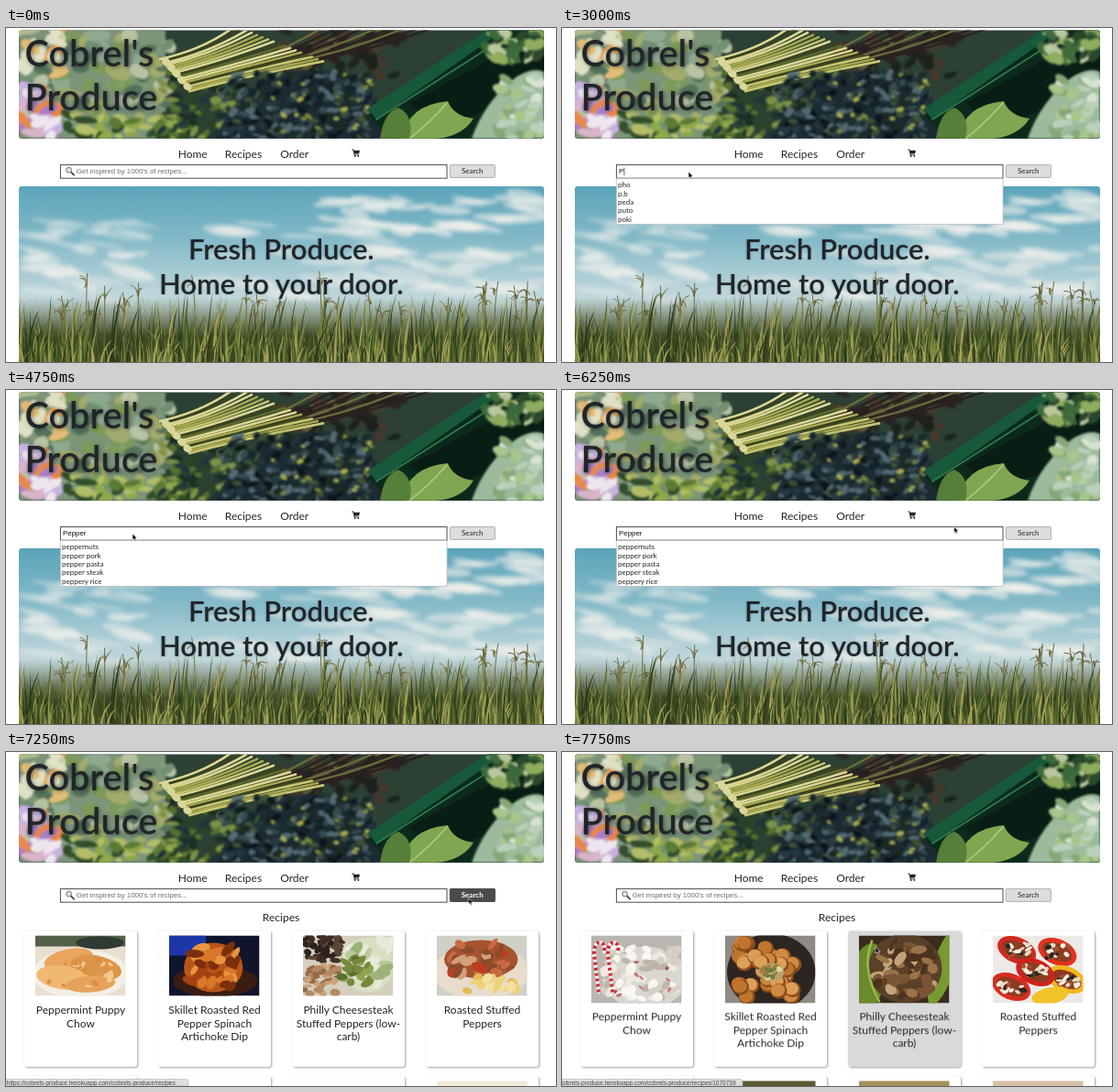
An HTML page that plays this animation: 600 by 365 pixels, repeating every 8 s.

```html
<!DOCTYPE html>
<html lang="en">
<head>
<meta charset="utf-8">
<title>Cobrel's Produce</title>
<style>
html, body { margin: 0; width: 100%; height: 100%; overflow: hidden; background: #fff; }
#stage { display: block; }
text { font-family: Lato, sans-serif; fill: #212529; }
.sans { font-family: "Liberation Sans", Arial, sans-serif; }
.mid { text-anchor: middle; }
.brand { font-weight: 600; filter: drop-shadow(1px 1px 2px rgba(20, 25, 25, .5)); }
.hero { font-weight: 600; filter: drop-shadow(0 0 1px rgba(30, 40, 45, .3)); }
.card { fill: #fff; filter: drop-shadow(1px 1px 1.2px rgba(0, 0, 0, .38)); }
</style>
</head>
<body>
<svg id="stage" width="600" height="365" viewBox="0 0 600 365" xmlns="http://www.w3.org/2000/svg"></svg>
<script>
const LOOP = 8000;
const $ = id => document.getElementById(id);

// seeded random helpers
let seed = 41;
const rnd = () => {
  seed = (seed + 0x6D2B79F5) | 0;
  let t = Math.imul(seed ^ (seed >>> 15), 1 | seed);
  t = (t + Math.imul(t ^ (t >>> 7), 61 | t)) ^ t;
  return ((t ^ (t >>> 14)) >>> 0) / 4294967296;
};
const between = (a, b) => a + (b - a) * rnd();
const pick = list => list[Math.floor(rnd() * list.length)];
const times = (n, make) => Array.from({ length: n }, (_, i) => make(i)).join('');
const f = n => n.toFixed(1);

// drawing helpers
const rect = (x, y, w, h, fill, more = '') =>
  `<rect x="${x}" y="${y}" width="${w}" height="${h}" fill="${fill}" ${more}/>`;
const oval = (x, y, rx, ry, fill, turn = 0) =>
  `<ellipse cx="${f(x)}" cy="${f(y)}" rx="${f(rx)}" ry="${f(ry)}" fill="${fill}" transform="rotate(${f(turn)} ${f(x)} ${f(y)})"/>`;
const path = (d, fill, more = '') => `<path d="${d}" fill="${fill}" ${more}/>`;
const line = (d, color, width) =>
  path(d, 'none', `stroke="${color}" stroke-width="${width}" stroke-linecap="round"`);
const text = (x, y, size, str, cls = '', more = '') =>
  `<text x="${x}" y="${y}" font-size="${size}" class="${cls}" ${more}>${str}</text>`;
const group = (id, body) => `<g id="${id}">${body}</g>`;
const soften = (filter, body) => `<g filter="url(#${filter})">${body}</g>`;
const scatter = (n, x, y, w, h, r, colors) => times(n, () =>
  oval(between(x, x + w), between(y, y + h), r * between(.6, 1.2), r * between(.3, .7), pick(colors), between(-70, 50)));

function banner() {
  const leaves = ['#6f8f74', '#8fa890', '#b7c3a2', '#55735c', '#a3ab6c', '#7d9a5a'];
  const kale = ['#17242c', '#26383f', '#354b50', '#1b2a24', '#526a72', '#3d5135', '#10181b'];
  return rect(14, 2, 573, 119, '#2c4033') + soften('haze',
    rect(14, 2, 160, 119, '#7c9478') +
    scatter(80, 14, 2, 165, 100, 13, leaves) +
    scatter(22, 14, 0, 45, 50, 11, ['#e3bd74', '#dfe0c4', '#aebb86', '#e8a053']) +
    scatter(26, 14, 66, 42, 54, 11, ['#c9b2e0', '#eee6ee', '#e8894a', '#d9b4cb', '#a97fc4']) +
    scatter(46, 66, 95, 130, 28, 9, ['#8fa84a', '#b2bd68', '#5c7a36', '#33502c']) +
    scatter(100, 170, 50, 90, 72, 7, ['#2b4326', '#54702f', '#1c2d20', '#7c9046', '#22323a']) +
    scatter(60, 300, 2, 130, 50, 9, ['#2a2320', '#46392f', '#1c221d', '#5b5a3a'])) +
    times(9, i => line(`M${250 + i * 9} ${46 - i} Q${300 + i * 12} 26 ${345 + i * 15} 0`, pick(['#4c4a2c', '#2b211f', '#6a6a3b']), 2.4)) +
    times(17, i => line(`M${168 + i * 2} ${34 + i * 2.2} Q${215 + i * 2} ${24 + i * 2} ${250 + i * 6} ${-2 + i * 2.4}`,
      pick(['#c9c672', '#a6a84e', '#dcd792', '#5f6a2c', '#3a451f']), 2.6)) +
    soften('haze',
      path('M230 121 Q245 70 300 52 Q350 38 395 58 L420 121Z', '#1a2930') +
      scatter(240, 235, 48, 165, 74, 5.5, kale) +
      scatter(26, 290, 45, 110, 70, 3.5, ['#a9ad52', '#7d8a3e'])) +
    times(5, i => oval(174 + i * 6, 36 + i * 7, 5, 4, '#d9d69a', 35)) +
    path('M395 95 L540 0 L587 0 L587 121 L420 121Z', '#0c2a1b') +
    path('M440 82 L550 22 L587 30 L587 70 L470 108Z', '#0a1d14') +
    path('M395 88 L528 0 L546 0 L404 100Z', '#17593a') +
    line('M404 100 L548 8', '#2f7d52', 1.5) +
    soften('haze', scatter(34, 525, 2, 62, 32, 9, ['#3d6b3a', '#8fac5e', '#2a4a2c', '#b9c89c'])) +
    path('M432 121 Q438 84 482 80 Q488 96 510 99 Q498 118 470 121Z', '#7fa650') +
    line('M440 121 Q462 104 481 82', '#b9cf8c', 1.2) +
    path('M408 121 Q412 92 428 87 Q446 96 440 121Z', '#567f3a') +
    soften('haze', path('M508 121 Q522 80 556 54 Q575 42 587 48 V121Z', '#9dbb9c') +
      scatter(34, 538, 56, 50, 65, 9, ['#b9d0bb', '#a9c58a', '#d7e2d2', '#86a877']));
}

function field() {
  const leaf = ['#46592a', '#6f8038', '#95984f', '#2b381d', '#586f2f', '#a8a25a', '#39451f'];
  const puffs = (n, x, y, w, h, o) => times(n, () =>
    `<g opacity="${o}">${oval(between(x, x + w), between(y, y + h), between(10, 32), between(2, 6), '#f3f1ec', between(-6, 16))}</g>`);
  const blade = (x, h, color) => {
    const w = between(.7, 1.7), lean = between(-14, 14), tip = 366 - h;
    return path(`M${f(x - w)} 367Q${f(x)} ${f(366 - h * .6)} ${f(x + lean)} ${f(tip)}Q${f(x + w)} ${f(366 - h * .5)} ${f(x + w)} 367Z`, color);
  };
  const stalk = () => {
    const x = between(16, 585), top = between(266, 312);
    return line(`M${f(x)} 345Q${f(x)} ${f(top + 20)} ${f(x + between(-5, 5))} ${f(top)}`, '#6f6c3c', 1) +
      times(4, () => line(`M${f(x)} ${f(top + 14)}q${f(between(-4, 4))} -9 ${f(between(-10, 10))} ${f(between(-12, 2))}`, pick(['#7f7446', '#5c5a30']), .9));
  };
  return rect(14, 173, 573, 192, 'url(#sky)') +
    soften('soft',
      puffs(16, 20, 212, 130, 30, .35) + puffs(26, 350, 186, 170, 38, .6) + puffs(10, 540, 182, 50, 30, .6) +
      puffs(16, 240, 212, 180, 45, .45) + puffs(26, 400, 240, 185, 48, .5) +
      puffs(16, 14, 240, 130, 30, .5) + puffs(24, 30, 266, 540, 36, .4)) +
    rect(14, 295, 573, 70, 'url(#soil)') +
    times(34, stalk) +
    times(400, () => blade(between(12, 590), between(38, 78), pick(leaf))) +
    times(300, () => blade(between(12, 590), between(14, 46), pick(leaf)));
}

// dish pictures, drawn in a box 98 wide
const before = [
  () => rect(0, 0, 98, 66, '#e8dfcf') + rect(0, 0, 98, 12, '#556048') + oval(70, 8, 26, 7, '#2e3a34') +
    oval(49, 42, 52, 27, '#f4efe6') + oval(36, 26, 27, 11, '#e9a55e', -12) + oval(66, 35, 28, 13, '#dd9549', 12) +
    oval(30, 46, 29, 13, '#efb873', 8) + oval(60, 53, 27, 9, '#e6a25a', -5) + scatter(18, 12, 20, 70, 36, 4, ['#f3c88e', '#d88c3d']),
  () => rect(0, 0, 98, 66, '#10152c') + rect(0, 0, 40, 22, '#1d36a8') + oval(50, 50, 46, 17, '#3a1d12') +
    oval(48, 35, 32, 27, '#b8561a') + scatter(30, 24, 14, 48, 42, 9, ['#d9772a', '#a3430f', '#e9953f', '#7d2f0c']),
  () => rect(0, 0, 98, 66, '#d5cfc0') + scatter(40, 0, 0, 40, 28, 6, ['#3f2d24', '#5c4634', '#2c2320']) +
    scatter(36, 0, 34, 40, 30, 6, ['#b58a62', '#95694a', '#caa27c']) + oval(70, 32, 28, 30, '#d8dfc3') +
    scatter(18, 50, 4, 44, 50, 9, ['#b9c99b', '#e6ead8', '#9db37a']) + scatter(24, 42, 24, 30, 28, 7, ['#75893c', '#5a7030', '#93a152']),
  () => rect(0, 0, 98, 66, '#cfd0c6') + oval(48, 40, 52, 30, '#e7dccd') + oval(48, 26, 40, 21, '#a5532f') +
    scatter(26, 16, 8, 64, 34, 8, ['#b93e22', '#8a4a2c', '#d3a07a', '#c66a41']) +
    scatter(14, 28, 46, 66, 16, 8, ['#ecd277', '#e3bc55', '#f2e2a2'])
];
const after = [
  () => rect(0, 0, 98, 74, '#b9b5b1') + oval(58, 46, 46, 34, '#dad6d0') +
    scatter(60, 16, 14, 76, 58, 8, ['#eeeae3', '#d5cfc4', '#f8f6f1', '#bdb5a8']) +
    scatter(9, 22, 24, 66, 44, 3, ['#c9707a', '#a94a58']) +
    [0, 15].map(x => {
      const d = `M${8 + x} 62L${3 + x} 20Q${3 + x} 6 ${11 + x} 8Q${15 + x} 10 ${14 + x} 18`;
      return line(d, '#f5efee', 4) + path(d, 'none', 'stroke="#cf2a35" stroke-width="4" stroke-dasharray="3 3"');
    }).join(''),
  () => rect(0, 0, 98, 74, '#8f8a83') + oval(50, 40, 48, 42, '#2c2521') +
    times(34, () => {
      const x = between(14, 86), y = between(6, 72);
      return oval(x, y, 9, 8.5, '#8b4c1d') + oval(x - 1, y - 1, 7.6, 7, pick(['#cf8a41', '#c0752f', '#dd9f57']));
    }) +
    oval(50, 40, 14, 10, '#b5a36b') + scatter(20, 40, 33, 20, 14, 4, ['#6f7c3c', '#ded2a4', '#a5793c']),
  () => rect(0, 0, 98, 74, '#3a2c1e') + oval(8, 48, 20, 40, '#6b8a2b', 12) + oval(92, 34, 12, 44, '#779a30', 18) +
    oval(50, 36, 40, 38, '#59402a') + scatter(70, 18, 8, 62, 58, 8, ['#7a5434', '#4a321f', '#9b7349', '#c3a47a', '#5f3f25']) +
    line('M14 6Q2 36 22 72', '#9db84c', 2.5),
  () => rect(0, 0, 98, 74, '#ece9e6') +
    [['#d2281f', 26, 16], ['#e2331f', 70, 18], ['#f0b71c', 80, 48], ['#cf2219', 46, 40], ['#d92c20', 20, 56]].map(([c, x, y]) =>
      oval(x, y, 22, 14, c, 24) + oval(x, y, 17, 9, '#8d3b22', 24) +
      scatter(16, x - 13, y - 7, 26, 14, 4, ['#f6f1e4', '#2b2522', '#e7dcc0', '#a5502f'])).join('') +
    oval(62, 66, 20, 9, '#f2c22a', -10)
];

const cardX = i => 20 + i * 146;
const pictures = (list, h) => list.map((draw, i) =>
  `<svg x="${cardX(i) + 12}" y="200.5" width="98.5" height="${h}" viewBox="0 0 98 ${h}" preserveAspectRatio="none">${draw()}</svg>`).join('');
const titles = [['Peppermint Puppy', 'Chow'], ['Skillet Roasted Red', 'Pepper Spinach', 'Artichoke Dip'],
  ['Philly Cheesesteak', 'Stuffed Peppers (low-', 'carb)'], ['Roasted Stuffed', 'Peppers']];

function recipes() {
  const cards = [195.5, 354].map(y => times(4, i => rect(cardX(i), y, 123, 148.5, '#fff', 'class="card" rx="3"'))).join('');
  const strip = (i, color) => rect(cardX(i) + 12, 359.5, 98.5, 6, color);
  return text(300, 184.5, 12, 'Recipes', 'mid') + cards +
    group('hover', rect(cardX(2), 195.5, 124, 148.5, '#d9d9d9', 'rx="4"')) +
    group('before', pictures(before, 66) + strip(3, '#f2ead9')) +
    group('after', pictures(after, 74) + ['#8b8068', '#5c5a33', '#a4925a', '#d6bfa6'].map((c, i) => strip(i, c)).join('')) +
    group('titles', titles.map((rows, i) => rows.map((row, k) =>
      text(cardX(i) + 61.5, f(286.3 + k * 14.4), 12, row, 'mid')).join('')).join(''));
}

const lists = [['pho', 'p.b', 'peda', 'puto', 'poki'],
  ['peppernuts', 'pepper pork', 'pepper pasta', 'pepper steak', 'peppery rice']];
const panel = (w, h) => rect(59.3, 164.5, w, h, '#fff', 'stroke="#b5b5b5" stroke-width=".7"');
const menu = (rows, i) => group('menu' + i, panel(421.8, 50) +
  rows.map((row, k) => text(61, f(174.2 + k * 9.35), 8, row)).join(''));

const words = ['', 'P', 'Pe', 'Pep', 'Pepp', 'Peppe', 'Pepper'];
const typed = words.map((word, i) => group('word' + i,
  text(62, 159.3, 7.9, word, 'sans', 'style="fill:#111"') + rect(62, 152.5, .7, 8.5, '#222', `id="caret${i}"`))).join('');

const status = (id, x, w, str) => group(id,
  path(`M0 357.5H${w - 3}Q${w} 357.5 ${w} 360.5V365H0Z`, '#dcdddf', 'stroke="#b4b6b8" stroke-width=".6"') +
  text(x, 364.4, 6.5, str, 'sans', 'style="fill:#444"'));
const site = 'cobrels-produce.herokuapp.com/cobrels-produce/recipes';

const button = (fill, edge, ink, weight) =>
  rect(484.4, 149.6, 49, 13.8, fill, `stroke="${edge}" stroke-width=".9" rx=".8"`) +
  text(508.7, 159.2, 8, 'Search', 'mid', `style="fill:${ink};font-weight:${weight}"`);

$('stage').innerHTML = `<defs>
  <linearGradient id="sky" x1="0" y1="0" x2="0" y2="1">
    <stop offset="0" stop-color="#5ba4ba"/><stop offset=".3" stop-color="#83b9c8"/>
    <stop offset=".6" stop-color="#bcd5da"/><stop offset="1" stop-color="#d6dcda"/>
  </linearGradient>
  <linearGradient id="soil" x1="0" y1="0" x2="0" y2="1">
    <stop offset="0" stop-color="#4a5530" stop-opacity="0"/><stop offset=".6" stop-color="#3c4822"/>
  </linearGradient>
  <filter id="soft"><feGaussianBlur stdDeviation="2.2"/></filter>
  <filter id="haze"><feGaussianBlur stdDeviation=".9"/></filter>
  <clipPath id="bannerBox">${rect(14, 2.5, 573, 118.3, '#000', 'rx="3"')}</clipPath>
  <clipPath id="fieldBox">${rect(14, 173, 573, 200, '#000', 'rx="3"')}</clipPath>
</defs>` +
  `<g clip-path="url(#bannerBox)">${banner()}</g>` +
  text(20.5, 41.5, 39.7, "Cobrel's", 'brand') + text(20.5, 89.5, 39.7, 'Produce', 'brand') +
  text(187.7, 141.5, 12, 'Home') + text(238.8, 141.5, 12, 'Recipes') + text(299.2, 141.5, 12, 'Order') +
  path('M377.3 132.6h1.9l.3 1.1h6.5l-.9 3.8h-4.6l.2.9h4.3v.8h-5.2l-1.2-5.7h-1.3z', '#212529') +
  oval(380.7, 140, .9, .9, '#212529') + oval(384.4, 140, .9, .9, '#212529') +
  group('home', `<g clip-path="url(#fieldBox)">${field()}</g>` +
    text(300.3, 253, 31, 'Fresh Produce.', 'hero mid') + text(300.3, 291, 31, 'Home to your door.', 'hero mid')) +
  group('recipes', recipes()) +
  rect(59.4, 149.6, 421.6, 14.6, '#fff', 'stroke="#4a4a4a" stroke-width="1"') +
  group('hint', line('M70.8 157.4L74.2 160.8', '#333', 1.6) +
    `<circle cx="68.6" cy="155.2" r="2.9" fill="#d3e6ef" stroke="#666" stroke-width=".9"/>` +
    text(76.7, 159.3, 7.88, "Get inspired by 1000's of recipes...", 'sans', 'style="fill:#6c6c6c"')) +
  typed + group('opening', panel(112, 27.5)) + lists.map(menu).join('') +
  button('#dddddd', '#a9a9a9', '#212529', 400) +
  group('dark', button('#4b4b4b', '#444', '#fff', 700)) +
  group('ring', rect(484.3, 149.5, 49.2, 14, 'none', 'stroke="#2b78d4" stroke-width="1.2" rx="1.2"')) +
  status('link', .8, 199, 'https://' + site) + status('detail', -2, 197, site + '/1070739') +
  group('pointer', path('M0 0V7L1.6 5.6L2.8 8.2L4 7.7L2.9 5.1H5Z', '#000', 'stroke="#fff" stroke-width=".6"'));

words.forEach((word, i) => {
  if (word) $('caret' + i).setAttribute('x', 62.3 + $('word' + i).firstChild.getComputedTextLength());
});

// hard steps: list of [time, value], first entry at 0
function step(id, prop, list) {
  const frames = list.map(([t, v]) => ({ offset: t / LOOP, [prop]: v, easing: 'step-end' }));
  frames.push({ offset: 1, [prop]: list[list.length - 1][1] });
  $(id).animate(frames, { duration: LOOP, iterations: Infinity });
}
// alternately shows and hides at the given times
function show(id, ...at) {
  const list = at.map((t, i) => [t, 1 - i % 2]);
  step(id, 'opacity', at[0] ? [[0, 0], ...list] : list);
}

show('home', 0, 7250);
show('recipes', 7250);
show('hint', 0, 2750, 7250);
show('opening', 2250, 2750);
const typing = [2250, 2750, 3250, 3500, 3750, 4000, 4250, 7250];
words.forEach((_, i) => show('word' + i, typing[i], typing[i + 1]));
show('caret6', 0, 4750, 5500, 6000);
show('menu0', 2750, 3500);
show('menu1', 3500, 7250);
show('dark', 6750, 7500);
show('ring', 7000, 7250);
show('link', 6750, 7500);
show('detail', 7750);
show('before', 7250, 7500);
show('after', 7500);
show('hover', 7750);
step('titles', 'transform', [[0, 'translate(0px,0px)'], [7500, 'translate(0px,7.2px)']]);

// one second of eased travel in five positions, optionally arched upwards
const glide = (start, [x0, y0], [x1, y1], arch = 0) => Array.from({ length: 5 }, (_, i) => {
  const k = i / 4, e = k * k * (3 - 2 * k);
  return [start + i * 250, x0 + (x1 - x0) * e, y0 + (y1 - y0) * e - arch * Math.sin(Math.PI * k)];
});
const route = [[0, 372, 40], ...glide(500, [372, 40], [168, 158]),
  [2000, 142.5, 156.7], [2250, 138, 157], ...glide(5500, [150, 157], [479, 157], 11),
  [6750, 503, 159], [7000, 504.6, 159.4], [7500, 430, 186], [7750, 342, 213]];
show('pointer', 500);
step('pointer', 'transform', route.map(([t, x, y]) => [t, `translate(${f(x)}px,${f(y)}px)`]));
</script>
</body>
</html>
```
